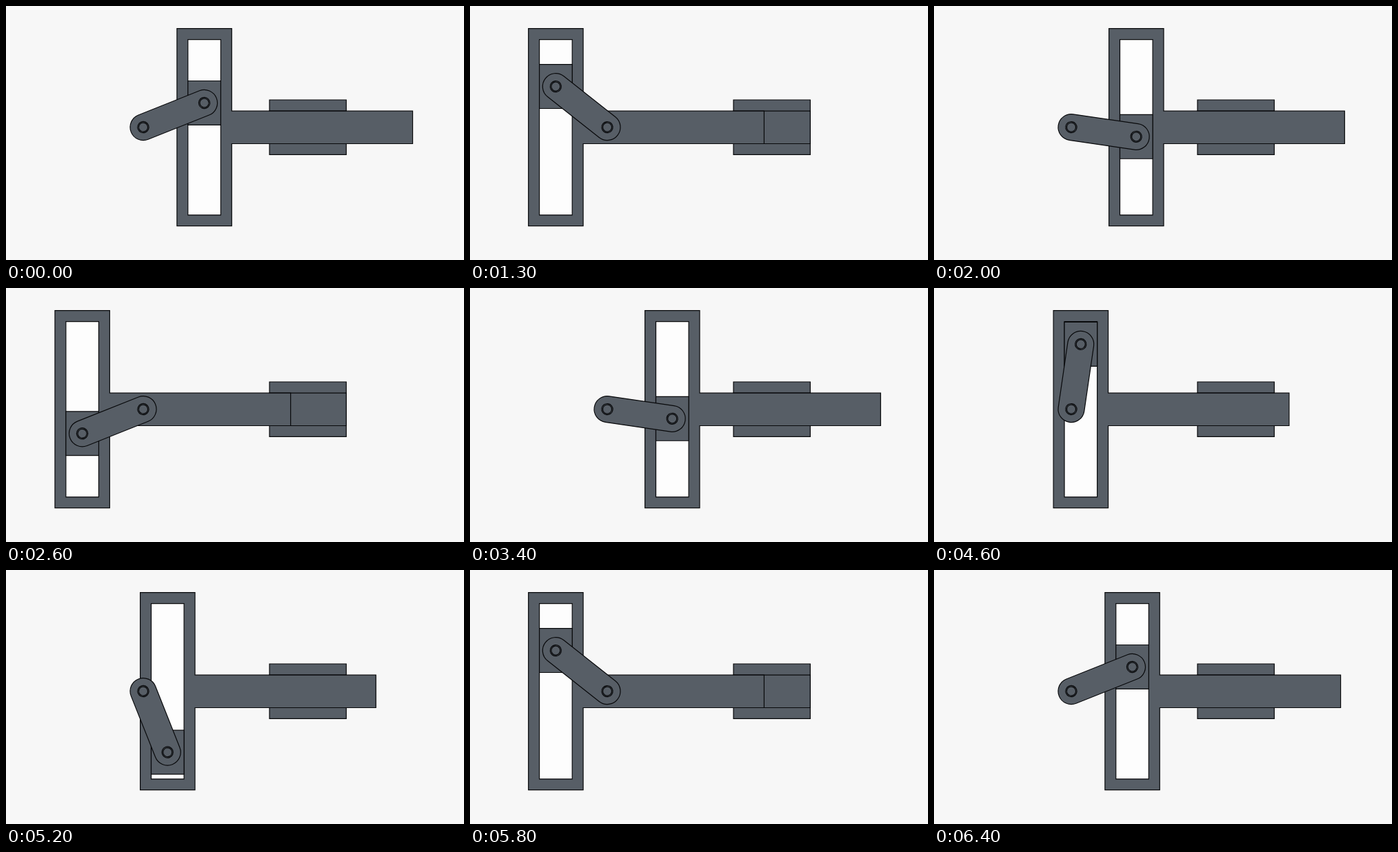
These frames come from a looping animation (664 by 368 pixels, 6.5 s). An HTML page with a canvas:

```html
<!DOCTYPE html>
<html lang="en">
<head>
<meta charset="utf-8">
<title>Scotch yoke</title>
<style>
html, body { margin: 0; width: 100%; height: 100%; overflow: hidden; background: #f7f7f7; }
canvas { display: block; width: 664px; height: 368px; }
</style>
</head>
<body>
<canvas id="stage" width="664" height="368"></canvas>
<script>
const ctx = document.getElementById('stage').getContext('2d');
const METAL = '#575e66', LINE = '#08090b', PAPER = '#f7f7f7', SLOT = '#fdfdfd';
const LOOP = 6500, TICK = 100, FIRST_MOVE = 4;
const PIVOT = { x: 199, y: 175.6 }, CRANK = 95.2;
const START = 21.7, STEP = 30;
// Ticks on which the crank rests instead of advancing.
const RESTS = [5, 10, 15, 20, 24, 30, 35, 40, 45, 50, 55, 60, 64];

function crankAngle(ms) {
  const tick = Math.floor((ms % LOOP) / TICK);
  const moves = Math.max(0, tick - FIRST_MOVE + 1);
  const rests = RESTS.filter(t => t <= tick).length;
  return (START - STEP * (moves - rests)) * Math.PI / 180;
}

function paint(fill) {
  ctx.fillStyle = fill;
  ctx.fill();
  ctx.stroke();
}

function box(x1, y1, x2, y2, fill) {
  ctx.beginPath();
  ctx.rect(x1, y1, x2 - x1, y2 - y1);
  paint(fill);
}

function disc(x, y, r) {
  ctx.beginPath();
  ctx.arc(x, y, r, 0, Math.PI * 2);
  paint(METAL);
}

function guide() {
  box(382, 136, 493.3, 215.4, METAL);
  box(382, 152.2, 493.3, 199.5, METAL);
}

function yoke(x) {
  const left = x - 39.6, right = x + 39.8, end = x + 302.1;
  ctx.beginPath();
  ctx.moveTo(left, 32.7);
  ctx.lineTo(right, 32.7);
  ctx.lineTo(right, 152.2);
  ctx.lineTo(end, 152.2);
  ctx.lineTo(end, 199.5);
  ctx.lineTo(right, 199.5);
  ctx.lineTo(right, 318.6);
  ctx.lineTo(left, 318.6);
  ctx.closePath();
  paint(METAL);
  box(x - 23.7, 48.6, x + 23.9, 302.8, SLOT);
}

function link(angle) {
  ctx.save();
  ctx.translate(PIVOT.x, PIVOT.y);
  ctx.rotate(-angle);
  ctx.beginPath();
  ctx.arc(0, 0, 19, Math.PI / 2, Math.PI * 1.5);
  ctx.arc(CRANK, 0, 19, -Math.PI / 2, Math.PI / 2);
  ctx.closePath();
  paint(METAL);
  for (const x of [0, CRANK]) {
    disc(x, 0, 8.1);
    disc(x, 0, 6.5);
  }
  ctx.restore();
}

function draw(ms) {
  const angle = crankAngle(ms);
  const x = PIVOT.x + CRANK * Math.cos(angle);
  const y = PIVOT.y - CRANK * Math.sin(angle);
  ctx.fillStyle = PAPER;
  ctx.fillRect(0, 0, 664, 368);
  ctx.strokeStyle = LINE;
  ctx.lineWidth = 1.2;
  ctx.lineJoin = 'miter';
  guide();
  yoke(x);
  box(x - 23.7, y - 31.9, x + 23.9, y + 31.9, METAL);
  link(angle);
}

const began = performance.now();
function frame() {
  draw(performance.now() - began);
  requestAnimationFrame(frame);
}
frame();
</script>
</body>
</html>
```
